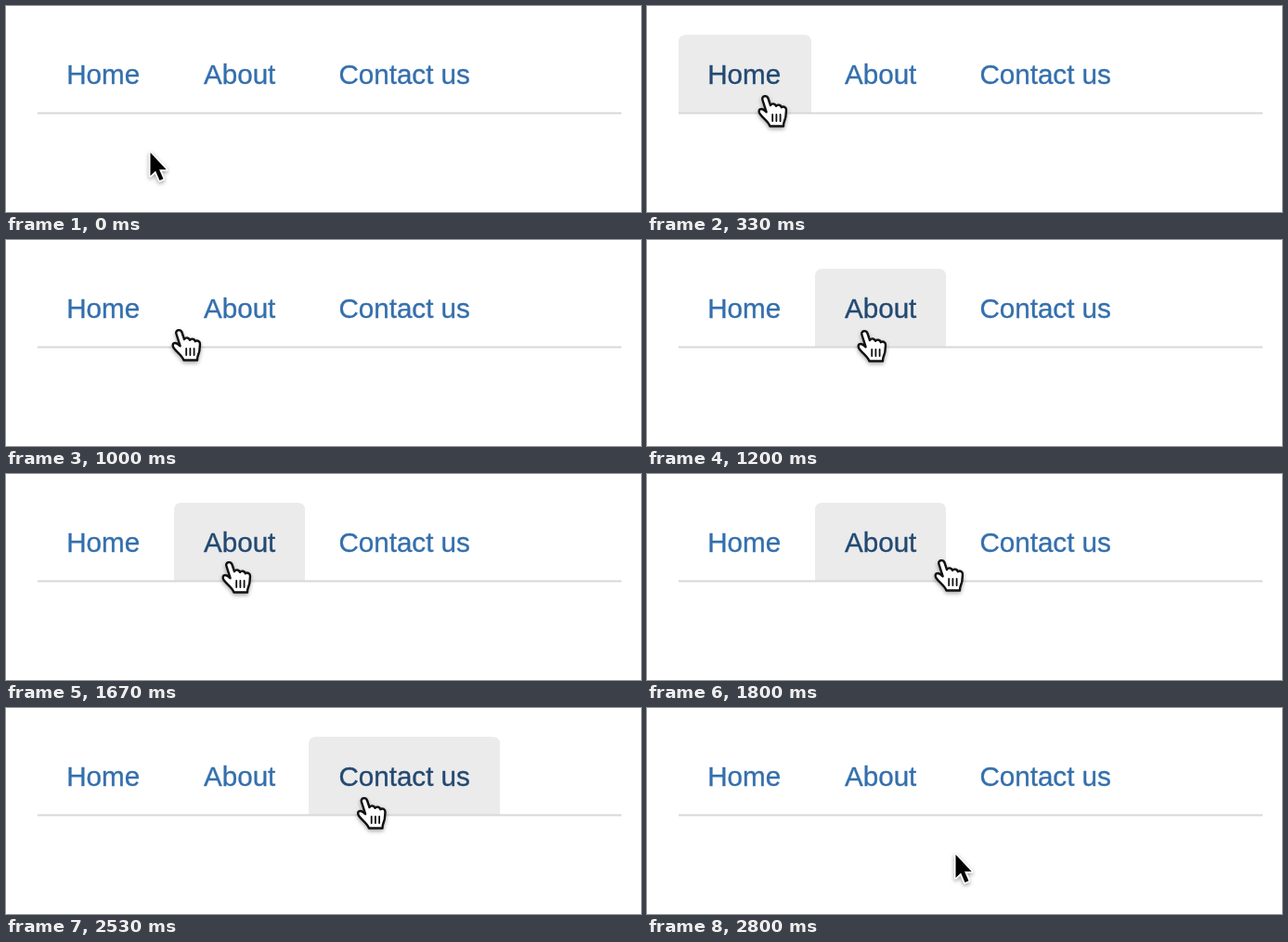
An HTML page for the animation above (3.67 s loop, 684 by 222 pixels).

```html
<!DOCTYPE html>
<html lang="en">
<head>
<meta charset="utf-8">
<title>Tab hover</title>
<style>
  html, body { margin: 0; width: 100%; height: 100%; overflow: hidden; background: #fff; }
  svg { display: block; width: 684px; height: 222px; }
  text { font: 29.6px "Liberation Sans", Arial, sans-serif; stroke-width: .35px; }
  .tab { fill: #346fad; stroke: #346fad; }
  .tab path { fill: none; stroke: none; }
  .tab.hover { fill: #23497290; fill: #234972; stroke: #234972; }
  .tab.hover path { fill: #ebebeb; }
  #cursor { filter: drop-shadow(0 2px 2px rgba(0, 0, 0, .35)); }
</style>
</head>
<body>
<svg viewBox="0 0 684 222">
  <g id="tabs"></g>
  <path d="M34 115.5H663" stroke="#d8d8d8" stroke-width="2"/>
  <g id="cursor">
    <path id="arrow" d="M0 0V25L5.6 19.8L10 30L14 28.3L9.6 18.2H17.2Z"
      stroke="#fff" stroke-width="3.4" paint-order="stroke" stroke-linejoin="round"/>
    <g id="hand" fill="#fff" stroke="#111" stroke-width="2.4" stroke-linejoin="round" stroke-linecap="round">
      <path d="M-2.6 4C-4 0 2-1.5 3.5 2.5L6 10C8 7.6 11 8 12 10.8C14 8.8 17 9.6 17.8 12.2C20 10.8 23 12 23 15L22.4 22C22 26 20 27 20 32.5H5.5C4 28-2 24-5.2 19.5C-8.5 14.5-4 12 0 16L1.6 17.2Z"/>
      <path d="M8.2 20V27M12.4 20V27M16.6 20V27" stroke-width="1.8"/>
    </g>
  </g>
</svg>
<script>
const LOOP = 3670, FRAME = 200 / 3;
const LINE_Y = 115;
const $ = id => document.getElementById(id);

const tabs = [
  { label: "Home", left: 34, right: 177, textX: 65.2 },
  { label: "About", left: 181, right: 322, textX: 213 },
  { label: "Contact us", left: 326, right: 532, textX: 358.4 }
];

const easeIn = u => u * u;
const easeOut = u => u * (2 - u);
const smooth = u => u * u * (3 - 2 * u);

// Pointer path: [frame, x, y, easing towards this point]
const path = [
  [0, 155.5, 158, smooth],
  [5, 127, 97, smooth],
  [12, 127, 97, smooth],
  [15, 186, 97, easeIn],
  [18, 234, 98, easeOut],
  [24, 234, 98, smooth],
  [25, 240, 95, smooth],
  [29, 394, 91, smooth],
  [37, 394, 91, smooth],
  [38, 385.5, 97, smooth],
  [42, 332.5, 158, easeOut]
];

function pointerAt(frame) {
  const i = path.findIndex(key => key[0] >= frame);
  if (i < 0) return path[path.length - 1].slice(1, 3);
  if (i === 0) return path[0].slice(1, 3);
  const [f0, x0, y0] = path[i - 1];
  const [f1, x1, y1, ease] = path[i];
  const u = ease((frame - f0) / (f1 - f0));
  return [x0 + (x1 - x0) * u, y0 + (y1 - y0) * u];
}

function addTab(tab) {
  const { left, right, textX, label } = tab;
  const r = 8;
  $("tabs").insertAdjacentHTML("beforeend",
    `<g class="tab"><path d="M${left} 116V${31 + r}q0 ${-r} ${r} ${-r}H${right - r}q${r} 0 ${r} ${r}V116Z"/>` +
    `<text x="${textX}" y="84">${label}</text></g>`);
  tab.node = $("tabs").lastElementChild;
}

function render(time) {
  const tick = Math.floor(time % LOOP / 10) * 10;
  const frame = Math.floor((tick + 3.4) / FRAME);
  const [x, y] = pointerAt(frame);
  const overBar = y < LINE_Y;
  for (const { node, left, right } of tabs) {
    node.classList.toggle("hover", overBar && x > left + 8 && x < right);
  }
  $("cursor").setAttribute("transform", `translate(${x.toFixed(1)} ${y.toFixed(1)})`);
  $("hand").style.display = overBar ? "" : "none";
  $("arrow").style.display = overBar ? "none" : "";
}

tabs.forEach(addTab);
const start = performance.now();
function loop() {
  render(performance.now() - start);
  requestAnimationFrame(loop);
}
loop();
</script>
</body>
</html>
```
